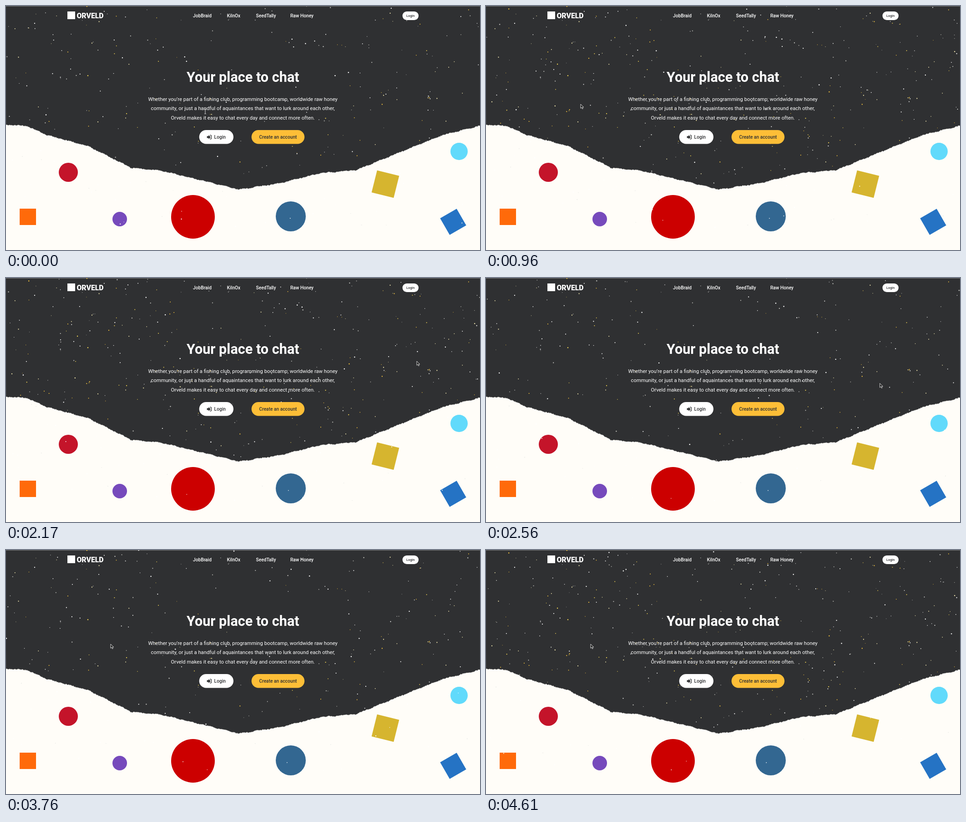
An HTML page with a canvas that plays this animation: 1042 px wide and 537 px high, repeating every 4.71 s.

```html
<!DOCTYPE html>
<html lang="en">
<head>
<meta charset="utf-8">
<title>Orveld</title>
<style>
html, body { margin: 0; width: 100%; height: 100%; overflow: hidden; background: #fffdf8; }
canvas, svg { position: absolute; left: 0; top: 0; width: 1042px; height: 537px; }
text { font-family: Roboto, sans-serif; fill: #fff; text-anchor: middle; }
.brand { font-size: 15.8px; font-weight: 900; }
.nav { font-size: 10.2px; font-weight: 500; }
.small { font-size: 7.3px; font-weight: 500; }
.title { font-size: 30.6px; font-weight: 700; }
.copy { font-size: 11.27px; }
.dark { fill: #2f3032; }
</style>
</head>
<body>
<canvas id="sky" width="1042" height="537"></canvas>
<svg viewBox="0 0 1042 537">
  <rect x="135" y="12" width="17" height="17" fill="#fff"/>
  <text class="brand" x="185" y="26.8">ORVELD</text>
  <g class="nav">
    <text x="431.5" y="25.3">JobBraid</text>
    <text x="500.5" y="25.3">KilnOx</text>
    <text x="571.5" y="25.3">SeedTally</text>
    <text x="650.5" y="25.3">Raw Honey</text>
  </g>
  <rect x="871.5" y="12" width="35.5" height="19" rx="9.5" fill="#fff"/>
  <text class="small dark" x="889.2" y="24.4">Login</text>

  <text class="title" x="520.8" y="167">Your place to chat</text>
  <g class="copy">
    <text x="520.7" y="209">Whether you’re part of a fishing club, programming bootcamp, worldwide raw honey</text>
    <text x="520.7" y="229.3">community, or just a handful of aquaintances that want to lurk around each other,</text>
    <text x="520.7" y="249.6">Orveld makes it easy to chat every day and connect more often.</text>
  </g>

  <rect x="424.7" y="273" width="75.3" height="30.5" rx="15.25" fill="#fff"/>
  <path class="dark" d="M441.7 286.5h3.6v-2.6l4.6 4.6-4.6 4.6v-2.6h-3.6z"/>
  <path d="M448 284.3h2.4q1 0 1 1v6.4q0 1-1 1H448" fill="none" stroke="#2f3032" stroke-width="1.3"/>
  <text class="nav dark" x="470.3" y="292">Login</text>
  <rect x="539.7" y="273" width="116.5" height="30.5" rx="15.25" fill="#fdbe37"/>
  <text class="nav dark" x="598" y="292">Create an account</text>

  <path id="arrow" d="M0 0V9.2L2.2 7.2 3.8 10.5 5.3 9.8 3.8 6.7H6.7Z" fill="#222" stroke="#fff" stroke-width=".8"/>
  <path id="beam" d="M-2-5.5Q0-5.5 0-4.5 0-5.5 2-5.5M0-4.5V4.5M-2 5.5Q0 5.5 0 4.5 0 5.5 2 5.5" fill="none" stroke="#ddd"/>
</svg>
<script>
const W = 1042, H = 537, LOOP = 4710, STEPS = 50, DRIFT_HEIGHT = 490;
const ctx = document.getElementById('sky').getContext('2d');
const arrow = document.getElementById('arrow'), beam = document.getElementById('beam');

function seeded(seed) {
  return () => {
    seed = (seed + 0x6D2B79F5) | 0;
    let n = Math.imul(seed ^ (seed >>> 15), 1 | seed);
    n ^= n + Math.imul(n ^ (n >>> 7), 61 | n);
    return ((n ^ (n >>> 14)) >>> 0) / 4294967296;
  };
}
const random = seeded(42);
const between = (a, b) => a + (b - a) * random();
const pick = list => list[Math.floor(random() * list.length)];
const mix = (a, b, u) => a + (b - a) * u;
const smooth = (a, b, v) => {
  const u = Math.max(0, Math.min(1, (v - a) / (b - a)));
  return u * u * (3 - 2 * u);
};

// Torn lower edge of the night sky: a few key points, roughened when drawn
const ridge = [[0, 261], [45, 264], [90, 284], [180, 308], [275, 356], [345, 363], [440, 386],
  [512, 404], [600, 390], [690, 368], [770, 361], [890, 312], [960, 284], [1042, 263]];
function edgeY(x) {
  const i = Math.max(1, ridge.findIndex(p => p[0] >= x));
  const [x0, y0] = ridge[i - 1], [x1, y1] = ridge[i];
  return mix(y0, y1, (x - x0) / (x1 - x0));
}
const sky = new Path2D();
sky.moveTo(-3, -3);
for (let x = 0; x <= W; x += 2) sky.lineTo(x, edgeY(x) + Math.sin(x / 6) * 0.6 + between(-1, 1));
sky.lineTo(W + 3, 263);
sky.lineTo(W + 3, -3);
sky.closePath();

// Fixed stars: half are always lit, half only in the bright part of the twinkle
const tones = ['#fff', '#f4e9b0', '#f0d255', '#f5c33f', '#a5a5a0'];
const stars = Array.from({ length: 330 }, (_, i) => ({
  x: between(0, W), y: between(0, 400), r: between(0.5, 1.2), color: pick(tones), blinks: i % 2 > 0
})).filter(s => s.y < edgeY(s.x) - 3);

const drifters = Array.from({ length: 150 }, () => ({
  x: between(0, W), y: between(0, DRIFT_HEIGHT), r: between(0.6, 1.25),
  vx: between(-2.5, 2.5), vy: between(-2.5, 2.5), color: pick(['#fff', '#fff', '#fff', '#b9b9b5'])
}));

function dot(x, y, r, color) {
  ctx.fillStyle = color;
  ctx.beginPath();
  ctx.arc(x, y, r, 0, 2 * Math.PI);
  ctx.fill();
}
function square(x, y, size, degrees, color) {
  ctx.save();
  ctx.translate(x, y);
  ctx.rotate(degrees * Math.PI / 180);
  ctx.fillStyle = color;
  ctx.fillRect(-size / 2, -size / 2, size, size);
  ctx.restore();
}

function drawLandscape() {
  ctx.fillStyle = '#fffdf8';
  ctx.fillRect(0, 0, W, H);
  ctx.fillStyle = '#2f3032';
  ctx.fill(sky);
  ctx.strokeStyle = '#77777780';
  ctx.stroke(sky);
  ctx.fillStyle = '#777';
  ctx.fillRect(0, 0, W, 1);

  dot(137, 366, 21, '#c4142a');
  square(48, 464, 36, 0, '#ff6a0a');
  dot(250, 469, 16, '#764abc');
  dot(411, 464, 48, '#cc0000');
  dot(626, 463, 33, '#336791');
  square(834, 392, 50, 14, '#d6b52f');
  dot(996, 320, 19, '#61dafb');
  square(983, 475, 42, -30, '#2573c4');
}

function drawStars(step) {
  const phase = (step / 13.3) % 1;
  const glow = smooth(0.2, 0.4, phase) - smooth(0.78, 0.98, phase);
  for (const s of stars) {
    ctx.globalAlpha = s.blinks ? glow : 1;
    dot(s.x, s.y, s.r, s.color);
  }
  ctx.globalAlpha = 1;
  for (const d of drifters) {
    const x = (d.x + d.vx * step + W) % W;
    const y = (d.y + d.vy * step + DRIFT_HEIGHT) % DRIFT_HEIGHT;
    const faint = d.color !== '#fff' && y > edgeY(x);
    dot(x, y, d.r, faint ? '#eeeeea' : d.color);
  }
}

// The pointer darts left, swings right in a sagging arc, swings back and rests
const swings = [
  { start: 0, end: 10, from: [438, 232], to: [208, 216], sag: 0, ease: u => u * u * (3 - 2 * u) },
  { start: 10, end: 23, from: [208, 216], to: [903, 183], sag: 56, ease: u => u * (2 - u) },
  { start: 23, end: 40, from: [903, 183], to: [230, 207], sag: 60, ease: u => u * u }
];
function drawPointer(step) {
  const swing = swings.find(s => step < s.end) || swings[swings.length - 1];
  const u = Math.min(1, (step - swing.start) / (swing.end - swing.start));
  const x = mix(swing.from[0], swing.to[0], swing.ease(u));
  const y = mix(swing.from[1], swing.to[1], u) + swing.sag * 4 * u * (1 - u);
  const overText = x > 313 && x < 729 && y > 195 && y < 254;
  arrow.style.display = overText ? 'none' : '';
  beam.style.display = overText ? '' : 'none';
  (overText ? beam : arrow).setAttribute('transform', `translate(${x} ${y})`);
}

let lastStep = -1;
function tick() {
  const t = performance.now() % LOOP;
  const step = Math.min(STEPS - 1, Math.floor(t * STEPS / LOOP + 0.1));
  if (step !== lastStep) {
    drawLandscape();
    drawStars(step);
    drawPointer(step);
    lastStep = step;
  }
  requestAnimationFrame(tick);
}
tick();
</script>
</body>
</html>
```
